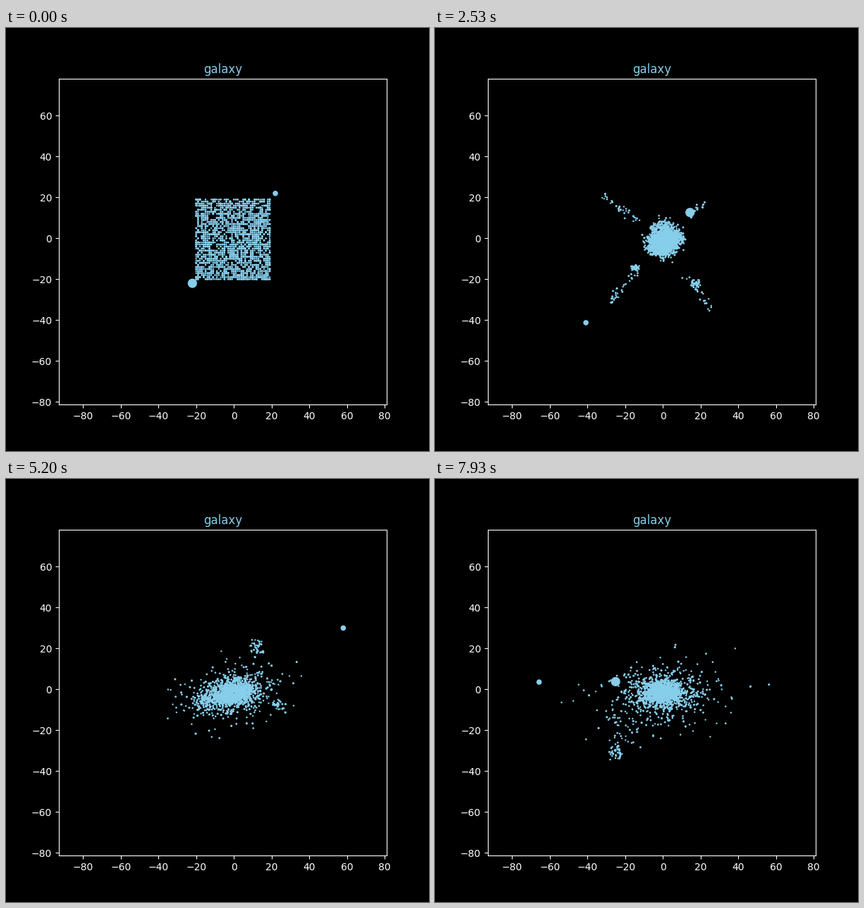
Write a matplotlib script that moves like this. It is 600 px wide and 600 px high and loops after 8 s.

```python
import numpy as np
import matplotlib.pyplot as plt
from matplotlib.animation import FuncAnimation

LOOP, FRAMES, STARS = 8000, 120, 2000
BLUE = "skyblue"
rng = np.random.default_rng(11)


def disc(n, age):
    """Tilted disc with a dense core and a long tail that both grow with age."""
    z = rng.normal(size=n)
    z = np.where(abs(z) > 2.6, z / 2, z)
    r = (4 + 3 * np.sqrt(age)) * np.exp(0.83 * age ** 0.25 * z)
    a = rng.uniform(0, 2 * np.pi, n)
    x, y = r * np.cos(a), 0.52 * r * np.sin(a)
    tilt = np.radians(25 * (1 - age))
    c, s = np.cos(tilt), np.sin(tilt)
    return np.column_stack([c * x - s * y, s * x + c * y - 1.7])


def clump(n, x, y, size):
    return rng.normal((x, y), size, (n, 2))


def arm(x, y, n=32):
    """Thin stream of stars from near the centre out to a tip."""
    along = rng.uniform(0.35, 1, (n, 1))
    return along * (x, y) + rng.normal(0, 1.3, (n, 2))


def match(prev, goal, side):
    """Send each star to a near place on the given side, outermost first."""
    guess = prev * side
    core = np.hypot(*prev.T) < 10
    guess[core] = rng.permutation(guess[core])
    out = np.empty_like(goal)
    for j in np.argsort(-np.hypot(*goal.T)):
        s = np.argmin(((guess - goal[j]) ** 2).sum(axis=1))
        out[s] = goal[j]
        guess[s] = 1e9
    return out


# The last two rows of every pose are the heavy and the light body.
square = rng.integers(-20, 20, (STARS, 2)).astype(float)
start = np.vstack([square, (-22, -22), (22, 22)])
times, poses = [0, 900], [start, 0.15 * start]
poses[1][:STARS] += rng.normal(0, 1.5, square.shape)


def stage(t, side, heavy, light, *groups):
    """Add a pose; side -1 swings the stars through the centre."""
    rest = STARS - sum(len(g) for g in groups)
    goal = np.vstack([disc(rest, t / LOOP), *groups])
    stars = match(poses[-1][:STARS], goal, side)
    times.append(t)
    poses.append(np.vstack([stars, heavy, light]))


stage(1800, -1, (38, 30), (-42, -43),
      arm(38, 30), arm(-55, 36), arm(43, -58), arm(-46, -52),
      clump(80, -25, -23.5, 1.6), clump(35, 29.5, -37, 1.2),
      clump(160, 12.5, 0, 1.8), clump(150, 5, 11, 3.3))
stage(3200, -1, (-21.5, -13), (-22.8, -24.7),
      clump(45, -21.3, 14, 1.4), clump(55, 28, 13.5, 2.4),
      clump(80, -14, -17, 3.2))
stage(4400, 1, (-47.5, -23), (46.2, 28),
      clump(70, -22.5, -6, 2.2), clump(30, -39.5, 13.8, 1.1),
      clump(90, 9, 11, 4))
stage(5200, 1, (-4, -4), (58, 30),
      clump(120, -15, -6, 2.6), clump(35, 12.5, 20, 2.2),
      clump(28, 24, -8, 1.5))
stage(6870, -1, (43, -4.3), (-15.2, -11),
      clump(20, 19, 12, 1), clump(35, -25, -22, 4))
stage(7870, -1, (-25.3, 3.8), (-65.8, 3.6),
      clump(40, -25, -31, 2), clump(40, -22, -18, 6))

times, poses = np.array(times, float), np.array(poses)
slopes = np.zeros_like(poses)
slopes[1:-1] = (poses[2:] - poses[:-2]) / (times[2:] - times[:-2])[:, None, None]
slopes[-1] = (poses[-1] - poses[-2]) / (times[-1] - times[-2])
stir = rng.normal(0, 2.5, poses.shape)
stir[0] = 0
stir[:, STARS:] = 0


def positions(t):
    """Cubic path between poses, with extra stirring close to the centre."""
    k = int(np.clip(np.searchsorted(times, t, "right") - 1, 0, len(times) - 2))
    h = times[k + 1] - times[k]
    u = (t - times[k]) / h
    pos = ((1 + 2 * u) * (1 - u) ** 2 * poses[k]
           + u * (1 - u) ** 2 * h * slopes[k]
           + u * u * (3 - 2 * u) * poses[k + 1]
           + u * u * (u - 1) * h * slopes[k + 1])
    r2 = (pos ** 2).sum(axis=1, keepdims=True)
    return pos + stir[k] * np.sin(np.pi * u) ** 2 * np.exp(-r2 / 120)


fig, ax = plt.subplots(figsize=(6, 6), dpi=100, facecolor="black")
ax.set_facecolor("black")
ax.set_xlim(-92.8, 81.05)
ax.set_ylim(-81.3, 78.1)
ax.set_xticks(range(-80, 81, 20))
ax.set_yticks(range(-80, 61, 20))
ax.tick_params(colors="white")
ax.spines[:].set_color("white")
ax.set_title("galaxy", color=BLUE, fontsize=12)

widths = np.append(rng.uniform(2.3, 3.3, STARS), [13.2, 7.6])  # pixels
dots = ax.scatter(*positions(0).T, s=(widths * 0.72) ** 2, c=BLUE, linewidths=0)


def update(i):
    dots.set_offsets(positions(i * LOOP / FRAMES))
    return dots,


anim = FuncAnimation(fig, update, frames=FRAMES, interval=LOOP / FRAMES,
                     repeat=True, repeat_delay=0)
plt.show()
```
